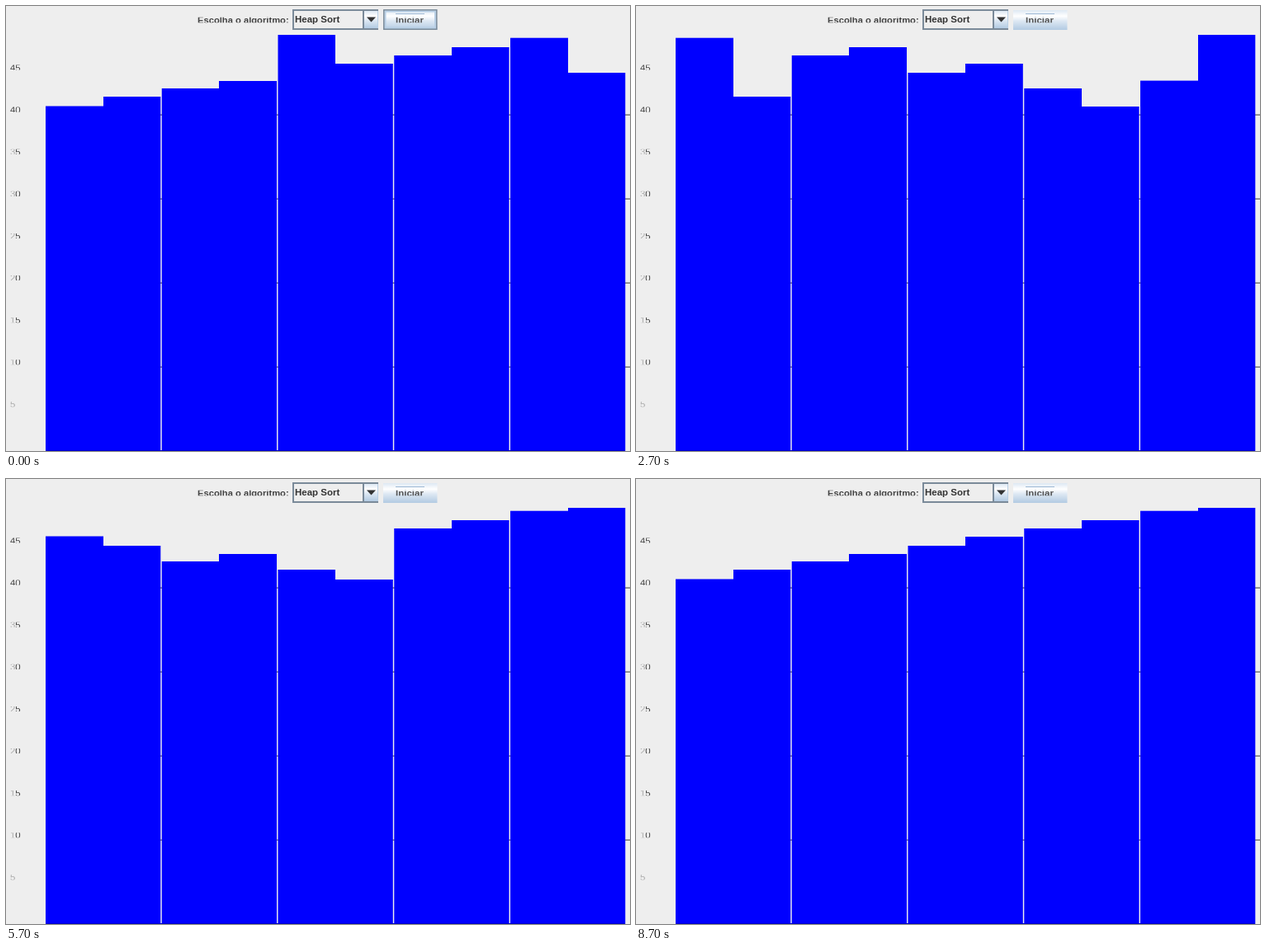
Write an HTML page that moves like this. It is 756 px wide and 540 px high and loops after 9 s.

```html
<!DOCTYPE html>
<html lang="pt">
<head>
<meta charset="utf-8">
<title>Heap Sort</title>
<style>
  html, body { margin: 0; width: 100%; height: 100%; overflow: hidden; background: #eee; }
  svg { display: block; width: 756px; height: 540px; overflow: hidden; }
  text { font: bold 11.4px "Liberation Sans", Arial, sans-serif; fill: #333; }
  .axis text { font-weight: normal; fill: #444; }
  .axis .faint { fill: #aaa; }
  .bars rect { fill: #00f; }
  .grid rect { fill: #555; }
</style>
</head>
<body>
<svg viewBox="0 0 756 540">
  <defs>
    <linearGradient id="shine" x2="0" y2="1">
      <stop offset="0" stop-color="#dde8f3"/>
      <stop offset=".3" stop-color="#fff"/>
      <stop offset=".55" stop-color="#dde8f3"/>
      <stop offset="1" stop-color="#b2cae2"/>
    </linearGradient>
    <clipPath id="labelRows"><rect x="230" y="13.8" width="116" height="6.4"/></clipPath>
    <clipPath id="buttonRows"><rect x="468" y="13.8" width="42" height="6.4"/></clipPath>
  </defs>

  <g class="grid"></g>
  <g class="bars"></g>
  <rect x="48" y="539" width="702" height="1" fill="#0000c8"/>
  <g class="axis"></g>

  <text x="232" y="21" style="font-size:11.2px;fill:#444" clip-path="url(#labelRows)">Escolha o algoritmo:</text>

  <g class="combo">
    <rect x="348" y="5" width="103" height="23" fill="#eee"/>
    <rect x="434" y="6" width="17" height="21" fill="url(#shine)"/>
    <path d="M451 5H348V28H451M433 5V28" fill="none" stroke="#7a8a99" stroke-width="2"/>
    <rect x="450" y="6" width="1" height="21" fill="#b8cfe5"/>
    <path d="M437 13.5h11l-5.5 6z" fill="#333"/>
    <text x="350" y="20.3" style="font-size:11.5px">Heap Sort</text>
  </g>

  <g class="button">
    <rect x="457" y="5" width="65.5" height="24" fill="url(#shine)"/>
    <g id="hover" fill="none">
      <rect x="459.5" y="6.5" width="60.5" height="20" stroke="#b8cfe5" stroke-width="2"/>
      <rect x="457.8" y="4.8" width="64" height="23.4" stroke="#7a8a99" stroke-width="1.5"/>
    </g>
    <rect x="472" y="9" width="35" height="1" fill="#9db8d4"/>
    <text x="472" y="21" style="font-size:11.5px;fill:#555" clip-path="url(#buttonRows)">Iniciar</text>
  </g>
</svg>

<script>
const STEP = 300;
const TOPS = [121.5, 109.7, 99.7, 90.6, 80.7, 69.5, 59.7, 49.7, 38.7, 34.7];
const START = [1, 2, 3, 4, 10, 6, 7, 8, 9, 5];
const PAIR_PITCH = 140.75, PAIR_WIDTH = 139.3;

function add(parent, tag, attrs, content = '') {
  const node = document.createElementNS('http://www.w3.org/2000/svg', tag);
  for (const name in attrs) node.setAttribute(name, attrs[name]);
  node.innerHTML = content;
  parent.appendChild(node);
  return node;
}

// Heap sort, keeping the list after every swap.
function heapSortSteps(list) {
  const a = [...list], steps = [[...a]];
  const swap = (i, j) => {
    [a[i], a[j]] = [a[j], a[i]];
    steps.push([...a]);
  };
  const sift = (root, size) => {
    let largest = root;
    for (const child of [2 * root + 1, 2 * root + 2])
      if (child < size && a[child] > a[largest]) largest = child;
    if (largest === root) return;
    swap(root, largest);
    sift(largest, size);
  };
  for (let i = a.length / 2 - 1; i >= 0; i--) sift(i, a.length);
  for (let end = a.length - 1; end > 0; end--) {
    swap(0, end);
    sift(0, end);
  }
  return steps;
}

const steps = heapSortSteps(START);

// Plays one value per step with hard changes.
function play(node, values, property) {
  const frames = [...values, values[values.length - 1]].map((value, i) => ({
    [property]: value, offset: i / values.length, easing: 'steps(1, end)'
  }));
  node.animate(frames, { duration: STEP * values.length, iterations: Infinity });
}

const find = selector => document.querySelector(selector);

for (let i = 0; i < 4; i++)
  add(find('.grid'), 'rect', { x: 48, y: 131.5 + 102 * i, width: 708, height: 1.2 });

for (let i = 0; i < 9; i++) {
  const label = String(45 - 5 * i), y = 78.6 + 51.1 * i;
  const clip = add(find('defs'), 'clipPath', { id: 'row' + i });
  add(clip, 'rect', { x: 4, y: y - 7.1, width: 16, height: 6.1 });
  const faint = i > 1 ? `<tspan class="faint">${label[0]}</tspan>${label.slice(1)}` : label;
  add(find('.axis'), 'text', { x: 5, y, 'clip-path': `url(#row${i})` }, faint);
}

// Bars stand in touching pairs; the shared edge sits on a whole pixel.
START.forEach((_, i) => {
  const left = 48 + PAIR_PITCH * (i >> 1);
  const middle = Math.round(left + PAIR_WIDTH / 2);
  const [from, to] = i % 2 ? [middle, left + PAIR_WIDTH] : [left, middle];
  const bar = add(find('.bars'), 'rect', { x: from, y: 0, width: to - from, height: 540 });
  play(bar, steps.map(list => `translateY(${TOPS[list[i] - 1]}px)`), 'transform');
});

play(find('#hover'), steps.map((_, i) => i ? 0 : 1), 'opacity');
</script>
</body>
</html>
```
